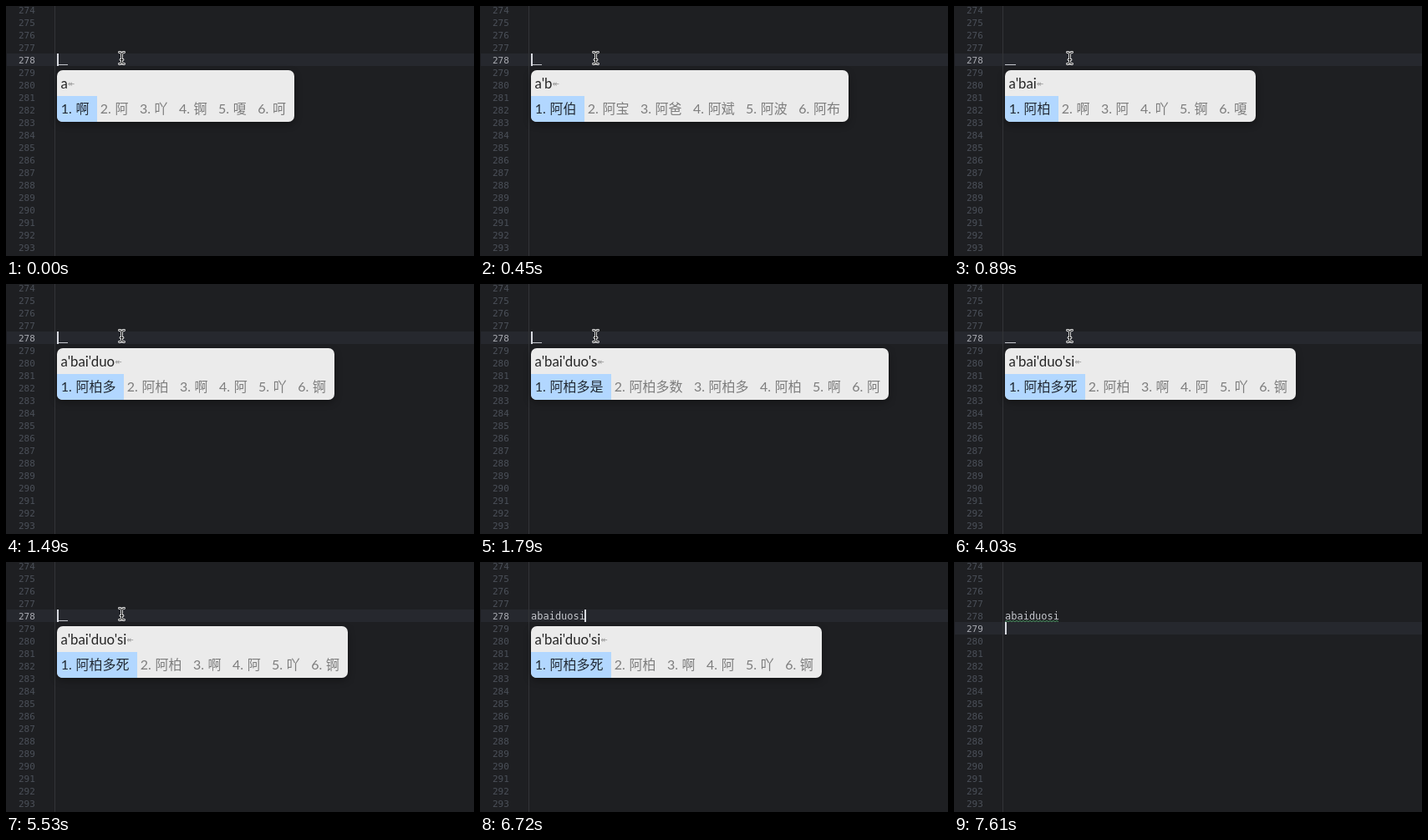
Write an HTML page that moves like this. It is 560 px wide and 300 px high and loops after 8000 ms.

```html
<!DOCTYPE html>
<html lang="zh">
<head>
<meta charset="utf-8">
<title>Input method in an editor</title>
<style>
  html, body { margin: 0; width: 100%; height: 100%; overflow: hidden; background: #1e1f22; }
  svg { display: block; }
  text { white-space: pre; }
  .num { font: 11px "DejaVu Sans Mono", monospace; fill: #4b5059; }
  .num.on { fill: #a9abb2; }
  .code { font: 12px "DejaVu Sans Mono", monospace; fill: #c4c6cc; }
  .pinyin { font: 16.8px Lato, sans-serif; fill: #252525; }
  .arrow { font: 10px "DejaVu Sans", sans-serif; fill: #9a9a9a; }
  .item { font: 16px Lato, "Noto Sans CJK SC", "Noto Sans CJK", sans-serif; fill: #7d7d7d; }
  .item.on { fill: #222a33; }
  .panel { fill: #ebebeb; filter: drop-shadow(0 3px 4px rgba(0, 0, 0, .35)); }
  .pick { fill: #b2d7ff; }
  .caret { fill: #d8dae0; }
</style>
</head>
<body>
<svg width="560" height="300" viewBox="0 0 560 300">
  <rect width="560" height="300" fill="#1e1f22"/>
  <rect id="row" x="1" width="559" height="15" fill="#26282e"/>
  <rect x="58" width="1" height="300" fill="#323438"/>
  <g id="numbers"></g>
  <text id="word" class="code" x="61" y="69">abaiduosi</text>
  <path id="wave" fill="none" stroke="#4f9a68" stroke-width="1"/>
  <rect id="mark" x="61" y="70" width="13" height="1" fill="#c4c6cc"/>
  <rect id="caret" class="caret" width="2" height="15"/>
  <g id="popup"></g>
  <g id="mouse" fill="none" stroke-linecap="round" stroke-linejoin="round">
    <path id="beam" d="M135.5 55.5Q138.5 55.5 138.5 58V67Q138.5 69.5 135.5 69.5M141.5 55.5Q138.5 55.5 138.5 58M138.5 67Q138.5 69.5 141.5 69.5M137 64.5H140" stroke="#eee" stroke-width="2.8"/>
    <use href="#beam" style="stroke:#000"/>
  </g>
</svg>
<script>
const LOOP = 8000, FIRST = 274, LAST = 293;
const COMMIT = 6720, CLOSE = 6870, CHECK = 7160, NEWLINE = 7610;
const BLINKS = [890, 1490, 1940, 2390, 2980, 3430, 4030, 4480, 4930, 5530, 5980, 6420];
const TYPING = [
  [0, "a", "啊 阿 吖 锕 嗄 呵"],
  [450, "a'b", "阿伯 阿宝 阿爸 阿斌 阿波 阿布"],
  [600, "a'ba", "阿爸 阿坝 阿巴 啊 阿 吖"],
  [890, "a'bai", "阿柏 啊 阿 吖 锕 嗄"],
  [1190, "a'bai'du", "啊拜读 阿柏 啊 阿 吖 锕"],
  [1340, "a'bai'duo", "阿柏多 阿柏 啊 阿 吖 锕"],
  [1790, "a'bai'duo's", "阿柏多是 阿柏多数 阿柏多 阿柏 啊 阿"],
  [1940, "a'bai'duo'si", "阿柏多死 阿柏 啊 阿 吖 锕"]
];

const el = id => document.getElementById(id);
const show = (id, on) => el(id).setAttribute("visibility", on ? "visible" : "hidden");
const rowTop = line => 57 + 15 * (line - 278);

for (let n = FIRST; n <= LAST; n++) {
  el("numbers").innerHTML += `<text class="num" x="15" y="${rowTop(n) + 12}">${n}</text>`;
}

let wave = "M61 71.5";
for (let x = 63; x <= 125; x += 2) wave += `L${x} ${(x - 61) % 4 ? 70.5 : 71.5}`;
el("wave").setAttribute("d", wave);

const beamCore = el("mouse").querySelector("use");
const core = el("beam").cloneNode();
core.removeAttribute("id");
core.setAttribute("stroke", "#111");
core.setAttribute("stroke-width", "1");
beamCore.replaceWith(core);

function popup([, pinyin, list]) {
  const items = list.split(" ");
  const extra = items.join("").length - items.length;
  const right = 61 + 48 + 16 * (items[0].length - 1);
  let x = 65.7;
  let out = `<rect class="panel" x="61" y="77" width="${284 + 16 * extra}" height="62" rx="7"/>
    <path class="pick" d="M61 108H${right}V139H68Q61 139 61 132Z"/>
    <text class="pinyin" x="65.5" y="98.5">${pinyin}<tspan class="arrow" dy="-1.5">↞</tspan></text>`;
  items.forEach((word, i) => {
    const cls = i ? "item" : "item on";
    out += `<text class="${cls}" x="${x}" y="128.5">${i + 1}.</text>
      <text class="${cls}" x="${x + 17.7}" y="128.5">${word}</text>`;
    x += 31.1 + 16 * word.length;
  });
  el("popup").innerHTML = out;
}

let step = null;
function draw(t) {
  const now = TYPING.filter(s => s[0] <= t).pop();
  if (now !== step) popup(step = now);

  const done = t >= COMMIT;
  const line = t >= NEWLINE ? 279 : 278;
  const lit = done || BLINKS.filter(b => b <= t).length % 2 === 0;
  show("popup", t < CLOSE);
  show("mouse", !done);
  show("mark", !done);
  show("word", done);
  show("wave", t >= CHECK);
  show("caret", lit);

  el("row").setAttribute("y", rowTop(line));
  el("caret").setAttribute("x", done && line === 278 ? 125 : 61);
  el("caret").setAttribute("y", rowTop(line));
  [...el("numbers").children].forEach((n, i) => n.classList.toggle("on", FIRST + i === line));
}

const start = performance.now();
function tick() {
  draw((performance.now() - start) % LOOP);
  requestAnimationFrame(tick);
}
tick();
</script>
</body>
</html>
```
